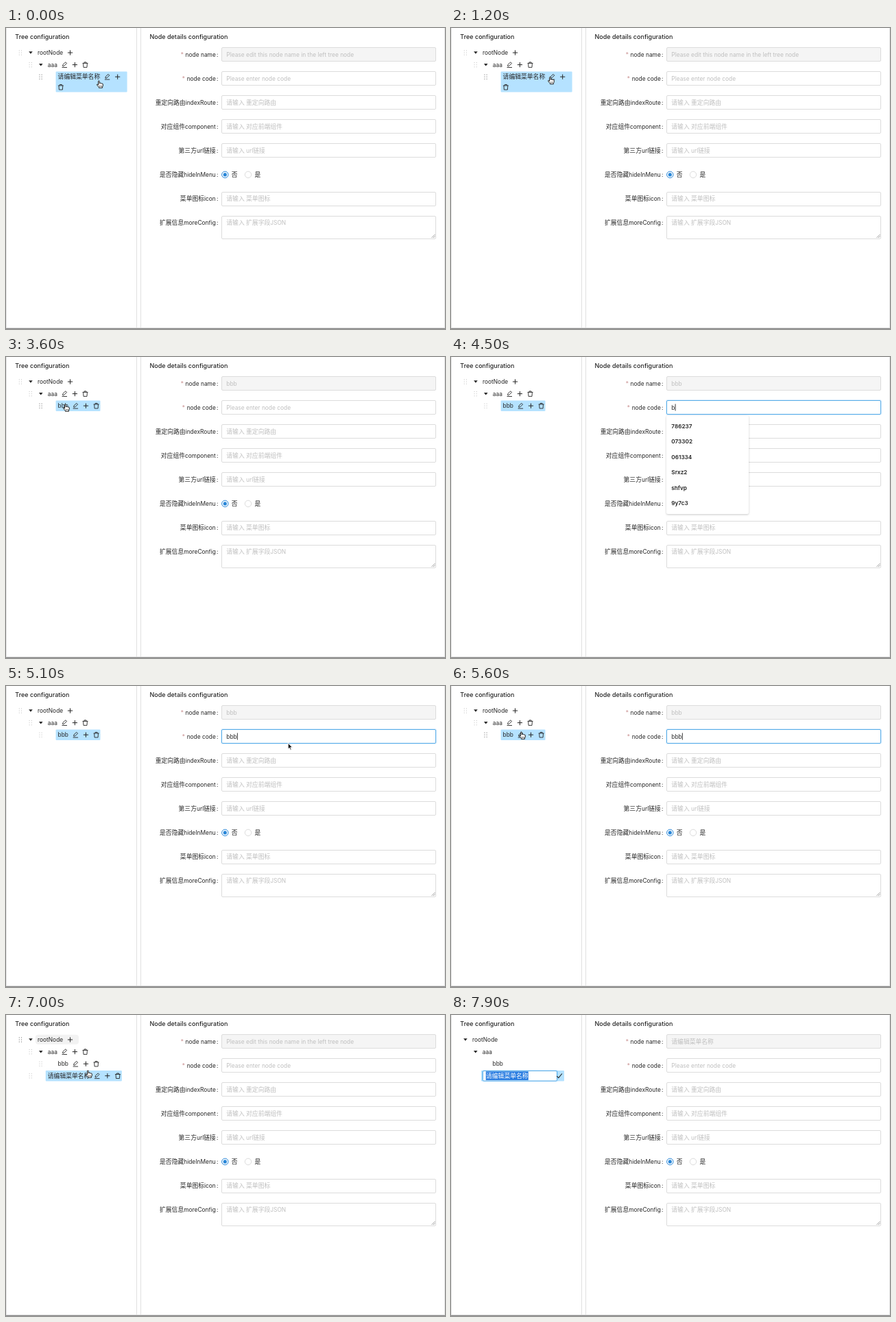
Recreate the animation shown at these times as an HTML page with a canvas. Size 640x439 px, loop 8000 ms.

```html
<!DOCTYPE html>
<html lang="en">
<head>
<meta charset="utf-8">
<title>Tree configuration</title>
<style>
  html, body { margin: 0; width: 100%; height: 100%; overflow: hidden; background: #fff; }
  canvas { display: block; width: 640px; height: 439px; }
</style>
</head>
<body>
<canvas id="stage"></canvas>
<script>
const W = 640, H = 439, LOOP = 8000, STEP = 100;
const INK = '#262626', HINT = '#bfbfbf', LINE = '#dcdcdc', BLUE = '#2a87d8', FOCUS = '#58ace6', PICK = '#b5e2ff';
const NEW_NAME = '请编辑菜单名称';
const FAMILY = 'Inter, "Noto Sans CJK SC", "Noto Sans CJK", sans-serif';
const CJK_FAMILY = '"Noto Sans CJK SC", "Noto Sans CJK", sans-serif';
const CODES = ['786237', '073302', '061334', 'Srxz2', 'shfvp', '9y7c3'];
const FIELDS = [
  ['重定向路由indexRoute', '请输入 重定向路由'],
  ['对应组件component', '请输入 对应前端组件'],
  ['第三方url链接', '请输入 url链接']
];

// Pointer path: time, x, y, kind (hand, arrow, beam; empty hides it afterwards)
const PATH = [
  [0, 137, 82, 'hand'], [200, 137, 82, 'hand'], [300, 135, 81, 'hand'], [500, 143, 79, 'hand'],
  [700, 143, 79, 'hand'], [800, 145, 77, 'hand'], [1000, 146, 76.5, 'hand'], [1200, 146, 76.5, 'hand'],
  [1300, 149, 73, 'hand'], [1600, 147, 73, 'beam'], [2400, 147, 73, ''],
  [3100, 76, 87, 'hand'], [3300, 67, 90, 'hand'], [3600, 88, 74, 'hand'], [3900, 107, 72, 'hand'],
  [4000, 200, 76, 'arrow'], [4100, 340, 76, 'beam'], [4200, 414, 76, 'beam'], [4400, 414, 76, ''],
  [5100, 414, 88, 'arrow'], [5300, 250, 82, 'arrow'], [5500, 114, 73, 'hand'], [5600, 104, 72, 'hand'],
  [5700, 103, 70, 'hand'], [5900, 97, 57, 'hand'], [6100, 95, 41, 'hand'], [6600, 95, 40, 'hand'],
  [6800, 110, 70, 'hand'], [7000, 121, 86, 'hand'], [7200, 133, 92, 'hand'],
  [7300, 136, 89, 'beam'], [7800, 136, 89, '']
];

const canvas = document.getElementById('stage');
const g = canvas.getContext('2d');
const dpr = window.devicePixelRatio || 1;
canvas.width = W * dpr;
canvas.height = H * dpr;

const within = (t, a, b) => t >= a && t < b;
const snap = v => Math.floor(v) + 0.5;

// Latin and CJK runs differ slightly in size; returns the total width.
function text(str, x, y, color = INK, size = 8.4, weight = 400, draw = true) {
  let w = 0;
  g.fillStyle = color;
  for (const run of str.match(/[\u4e00-\u9fff]+|[^\u4e00-\u9fff]+/g) || []) {
    const cjk = /[\u4e00-\u9fff]/.test(run);
    g.font = `${weight} ${cjk ? 8.8 : size}px ${cjk ? CJK_FAMILY : FAMILY}`;
    if (draw) g.fillText(run, x + w, y + 3.1);
    w += g.measureText(run).width;
  }
  return w;
}
const widthOf = str => text(str, 0, 0, INK, 8.4, 400, false);

function box(x, y, w, h, r, fill, stroke, lw = 1) {
  g.beginPath();
  g.roundRect(x, y, w, h, r);
  if (fill) { g.fillStyle = fill; g.fill(); }
  if (stroke) { g.strokeStyle = stroke; g.lineWidth = lw; g.stroke(); }
}

function lines(color, width, ...paths) {
  g.strokeStyle = color;
  g.lineWidth = width;
  g.beginPath();
  for (const p of paths) {
    for (let i = 0; i < p.length; i += 2) i ? g.lineTo(p[i], p[i + 1]) : g.moveTo(p[0], p[1]);
  }
  g.stroke();
}

function at(x, y, fn) {
  g.save();
  g.translate(x, y);
  fn();
  g.restore();
}

const icons = {
  edit() {
    lines(INK, 0.9, [-3.7, 3.9, 3.7, 3.9], [-2.7, 2, -2.3, -0.3, 1.5, -3.8, 3.2, -2.1, -0.6, 1.7, -2.7, 2]);
  },
  plus() { lines(INK, 1, [-3.6, 0, 3.6, 0], [0, -3.6, 0, 3.6]); },
  trash() {
    lines(INK, 0.9, [-4, -2.2, 4, -2.2], [-1.5, -2.2, -1.5, -3.7, 1.5, -3.7, 1.5, -2.2],
      [-2.9, -2.2, -2.5, 3.8, 2.5, 3.8, 2.9, -2.2]);
  },
  check() { lines(INK, 1.1, [-3.8, 0.4, -1.2, 3, 3.9, -3.2]); }
};
const icon = (name, x, y) => at(x, y, icons[name]);

function arrowDown(x, y) {
  g.fillStyle = INK;
  g.beginPath();
  g.moveTo(x - 2.8, y - 1.7);
  g.lineTo(x + 2.8, y - 1.7);
  g.lineTo(x, y + 1.8);
  g.fill();
}

function handle(x, y, dark) {
  g.fillStyle = dark ? '#808080' : '#cacaca';
  for (let i = 0; i < 6; i++) g.fillRect(x - 2.2 + (i % 2) * 3.2, y - 3.6 + (i >> 1) * 3.1, 1.1, 1.1);
}

function node(name, depth, y, o = {}) {
  const x = 46 + depth * 14.8;
  if (o.plain) {
    if (o.open) arrowDown(x - 25, y);
    text(name, x - 15, y);
    return;
  }
  const end = x + widthOf(name);
  const names = depth ? ['edit', 'plus', 'trash'] : ['plus'];
  if (o.picked) {
    if (o.wrap) box(x - 3, 63.5, 104, 30, 1, PICK);
    else box(x - 3, y - 7.8, end + 49.5 - x, 15.6, 1, PICK);
  }
  if (o.glow) box(x - 3, y - 7.3, 63, 14, 4, '#f2f2f2');
  handle(x - 25, y, o.dark);
  if (o.open) arrowDown(x - 10, y);
  text(name, x, y);
  names.forEach((n, i) => {
    if (o.wrap && i === 2) icon(n, x + 4.3, y + 15);
    else icon(n, end + 10.4 + i * 15.1, y);
  });
}

function caret(x, y) {
  g.fillStyle = INK;
  g.fillRect(x + 0.2, y - 5, 0.9, 10);
}

function focusBox(x, y, w, h) {
  box(x, y, w, h, 1.5, null, 'rgba(24,144,255,.14)', 2.8);
  box(x, y, w, h, 1.5, '#fff', FOCUS);
}

function nameInput(x, y, value, selected) {
  focusBox(x + 0.5, snap(y - 7.4), 108, 14.6);
  const w = widthOf(value);
  if (selected) {
    g.fillStyle = '#2a7de1';
    g.fillRect(x + 4.8, y - 6.4, w + 0.4, 12.8);
  }
  text(value, x + 5, y, selected ? '#fff' : INK);
  if (!selected) caret(x + 5 + w, y);
}

function label(str, y, required) {
  const x = 305.8 - widthOf(str);
  text(str, x, y);
  text(':', 306.9, y);
  if (required) text('*', x - 6.8, y + 0.6, '#c98f8f');
}

function field(y, value, o = {}) {
  const top = snap(y - 9.9);
  if (o.focus) focusBox(314.5, top, 312, 20);
  else box(314.5, top, 312, o.h || 20, 1.5, o.off ? '#f5f5f5' : '#fff', LINE);
  const w = text(value, 321.3, y, o.typed ? INK : HINT);
  if (o.focus) caret(321.3 + (o.typed ? w : 0), y);
}

function radio(x, y, on, str) {
  g.lineWidth = 1;
  g.strokeStyle = on ? BLUE : LINE;
  g.beginPath();
  g.arc(x, y, 4.7, 0, 7);
  g.stroke();
  if (on) {
    g.fillStyle = BLUE;
    g.beginPath();
    g.arc(x, y, 2.6, 0, 7);
    g.fill();
  }
  text(str, x + 9.5, y);
}

function frameLines() {
  g.fillStyle = '#fff';
  g.fillRect(0, 0, W, H);
  lines('#e0e0e0', 1, [0.5, 0, 0.5, 437], [190.5, 0, 190.5, 437], [196.5, 0, 196.5, 437], [639.5, 0, 639.5, 437]);
  lines('#858585', 1, [0, 438.5, W, 438.5]);
  lines('#d4d4d4', 1, [0, 437.5, W, 437.5]);
  text('Tree configuration', 13.3, 13, INK, 9, 500);
  text('Node details configuration', 209.5, 13, INK, 9, 500);
}

function tree(t, p) {
  const edit1 = within(t, 1600, 3400), edit2 = t >= 7300, plain = edit1 || edit2;
  const over = p && p.kind === 'hand' && p.x < 190 && p.y > 62 && t < 6000;
  const glow = within(t, 6200, 7200);
  node('rootNode', 0, 36, { plain, open: true, glow, dark: glow });
  node('aaa', 1, 53.6, { plain, open: true });

  if (t < 1600) node(NEW_NAME, 2, 71.2, { picked: true, wrap: true, dark: over });
  else if (edit1) {
    box(59, 63.5, 118, 30, 1, PICK);
    const n = t < 2400 ? 0 : t < 2500 ? 1 : t < 2700 ? 2 : 3;
    nameInput(61, 71.4, n ? 'b'.repeat(n) : NEW_NAME, !n);
    icon('check', 66, 86.3);
  } else node('bbb', 2, 71.2, { plain, picked: t < 6300, dark: over });

  if (edit2) {
    box(44, 81, 121, 15.4, 1, PICK);
    nameInput(46, 88.7, NEW_NAME, true);
    icon('check', 158, 88.7);
  } else if (t >= 6300) node(NEW_NAME, 1, 88.7, { picked: true });
}

function form(t) {
  const row = i => 38.4 + i * 35.1;
  const name = within(t, 3400, 6300) ? 'bbb'
    : within(t, 1600, 3400) || t >= 7300 ? NEW_NAME : 'Please edit this node name in the left tree node';
  const n = !within(t, 4400, 6300) ? 0 : t < 4600 ? 1 : t < 4800 ? 2 : 3;

  label('node name', row(0), true);
  field(row(0), name, { off: true });
  label('node code', row(1), true);
  field(row(1), n ? 'b'.repeat(n) : 'Please enter node code', { typed: n > 0, focus: within(t, 4200, 6200) });
  FIELDS.forEach(([title, hint], i) => {
    label(title, row(i + 2));
    field(row(i + 2), hint);
  });
  label('是否隐藏hideInMenu', row(5));
  radio(319.3, row(5), true, '否');
  radio(353, row(5), false, '是');
  label('菜单图标icon', row(6));
  field(row(6), '请输入 菜单图标');
  label('扩展信息moreConfig', row(7));
  field(row(7), '请输入 扩展字段JSON', { h: 33 });
  lines('#888', 0.8, [620.5, 306, 625.5, 301], [623, 306, 625.5, 303.5]);

  if (within(t, 4200, 4600)) {
    g.save();
    g.shadowColor = 'rgba(0,0,0,.22)';
    g.shadowBlur = 3 * dpr;
    g.shadowOffsetY = dpr;
    box(314, 85.5, 120, 143.5, 2, '#fff');
    g.restore();
    CODES.forEach((c, i) => text(c, 321.3, 100.8 + i * 22.5, '#222', 8.2, 600));
  }
}

function pointer(t) {
  let i = PATH.length - 1;
  while (PATH[i][0] > t) i--;
  const a = PATH[i], b = PATH[i + 1];
  if (!a[3]) return null;
  const k = b ? (t - a[0]) / (b[0] - a[0]) : 0;
  return { x: a[1] + (b ? (b[1] - a[1]) * k : 0), y: a[2] + (b ? (b[2] - a[2]) * k : 0), kind: a[3] };
}

const HAND = new Path2D('M-2.6 1.3V-4.2Q-2.6-5.4-1.7-5.4T-.8-4.2V-1.2Q-.7-2 .1-2T1-1.1Q1.2-1.7 1.9-1.6T2.8-.7'
  + 'Q3.1-1.2 3.8-1T4.6 0V2.2Q4.6 3.3 3.7 4.2V5.6H-1.7V4.5L-4.6 1.2Q-5.1.3-4.4 0T-2.6 1.3Z');
const ARROW = new Path2D('M-3-5V4.4L-.8 2.4.7 5.8 2.3 5.1.8 1.8H3.8Z');

function drawPointer(p) {
  if (!p) return;
  at(p.x, p.y, () => {
    if (p.kind === 'beam') {
      lines('#333', 0.8, [0, -4.5, 0, 4.5], [-1.7, -5, 0, -4.4, 1.7, -5], [-1.7, 5, 0, 4.4, 1.7, 5]);
      return;
    }
    const hand = p.kind === 'hand', shape = hand ? HAND : ARROW;
    g.scale(0.94, 0.94);
    g.lineJoin = 'round';
    g.lineWidth = 1;
    g.fillStyle = hand ? '#fff' : '#111';
    g.strokeStyle = hand ? '#111' : '#fff';
    g.fill(shape);
    g.stroke(shape);
    if (hand) lines('#111', 0.6, [-0.6, 2, -0.6, 4.2], [1, 2, 1, 4.2], [2.6, 2, 2.6, 4.2]);
  });
}

const start = performance.now();

function render() {
  const t = Math.floor(((performance.now() - start) % LOOP) / STEP) * STEP;
  const p = pointer(t);
  g.setTransform(dpr, 0, 0, dpr, 0, 0);
  frameLines();
  tree(t, p);
  form(t);
  drawPointer(p);
  requestAnimationFrame(render);
}
render();
</script>
</body>
</html>
```
